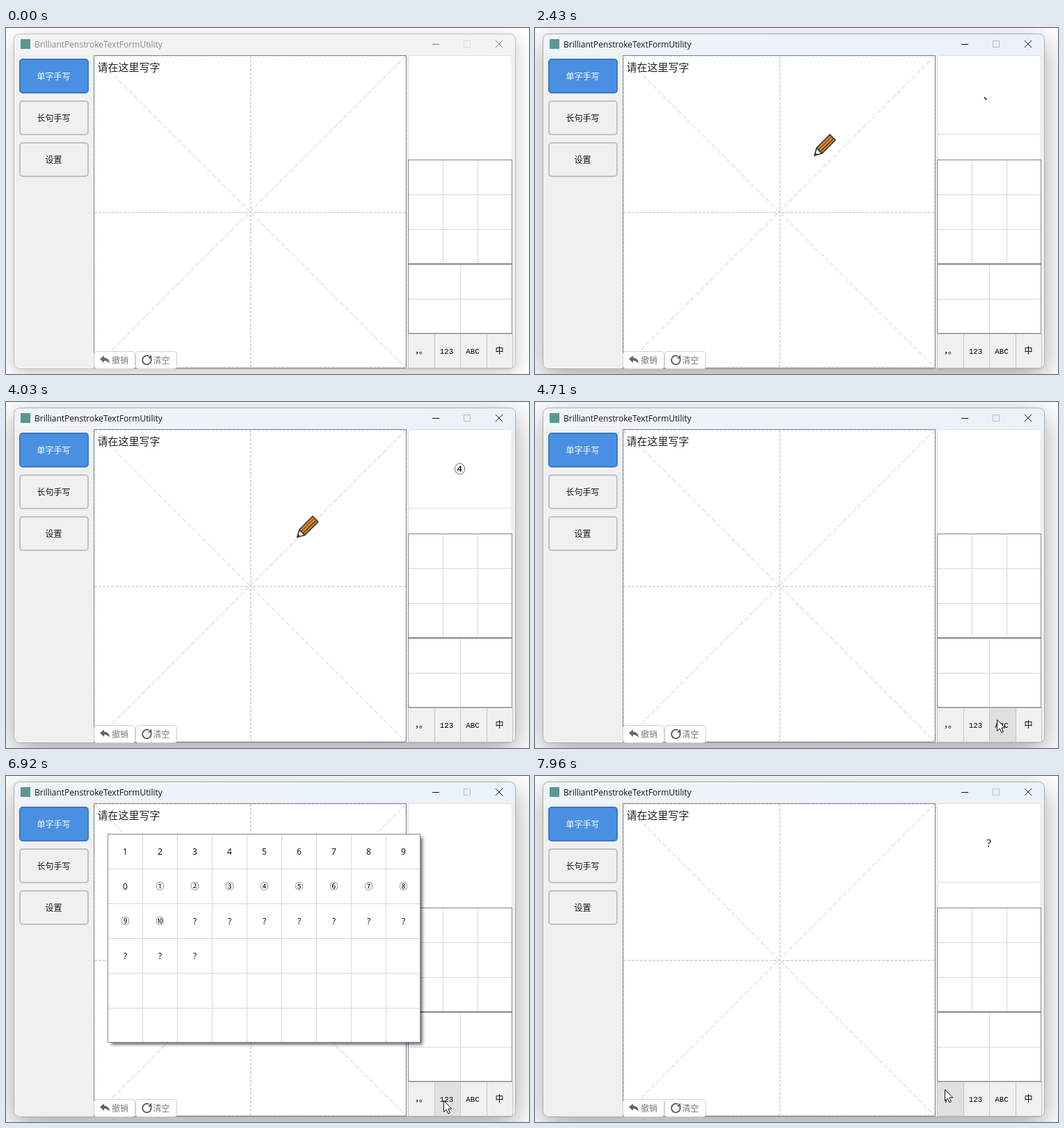
An HTML page with a canvas for the animation above (8 s loop, 752x497 px).

```html
<!DOCTYPE html>
<html lang="zh">
<head>
<meta charset="utf-8">
<style>
html, body { margin: 0; width: 100%; height: 100%; overflow: hidden; background: #fff; }
canvas { display: block; }
</style>
</head>
<body>
<canvas id="stage" width="752" height="497"></canvas>
<script>
const ctx = document.getElementById('stage').getContext('2d');
const LOOP = 8000;
const CJK = '"Noto Sans CJK SC", "Noto Sans CJK", sans-serif';
const UI = '"Open Sans", "Noto Sans CJK SC", sans-serif';
const MONO = '"Liberation Mono", "Noto Sans CJK SC", monospace';
const SERIF = '"Liberation Serif", "Noto Sans CJK SC", serif';
const EDGE = '#828790', GRID = '#d8d8d8';

const ACTIVE_AT = 2110;
const KEY_X = [578, 616, 653, 691, 728];
const KEY_LABELS = ['，。', '123', 'ABC', '中'];

const letters = 'ABCDEFGHIJKLMNOPQRSTUVWXYZ';
const SETS = [
  '。，、；：？！…—""\'\'（）《》〈〉【】『』「」﹃﹄［］｛｝．，？！～',
  '1234567890①②③④⑤⑥⑦⑧⑨⑩??????????',
  letters + letters.toLowerCase()
];
const TINTS = { '；': '#2a6f9a', '：': '#2a6f9a', '，': '#3a6a88', '「': '#b87328' };

// Each visit: popup key, open and close time, chosen symbol, time the result clears
const VISITS = [
  { key: 0, open: 860, close: 2110, pick: '、', clear: 2610 },
  { key: 1, open: 3470, close: 3960, pick: '④', clear: 4450 },
  { key: 2, open: 4910, close: 5920, pick: 'L', clear: 6420 },
  { key: 1, open: 6920, close: 7540, pick: '?', clear: LOOP }
];

// Pointer path: time, x, y
const PATH = [
  [290, 562, 490], [450, 597, 474], [1230, 597, 474], [1630, 424, 175],
  [1850, 310, 126], [2070, 264, 119], [2310, 277, 113], [2560, 533, 259],
  [2700, 630, 380], [2830, 668, 437], [2910, 668, 437], [3270, 631, 468],
  [3430, 630, 468], [3850, 372, 155], [3960, 372, 155], [4230, 546, 309],
  [4270, 577, 328], [4710, 664, 456], [4910, 664, 456], [5350, 250, 129],
  [5560, 250, 129], [5760, 273, 170], [5960, 273, 170], [6400, 545, 420],
  [6520, 592, 480], [6720, 629, 467], [6920, 629, 467], [7400, 418, 205],
  [7540, 418, 205], [7720, 420, 358], [7960, 589, 450]
];

function pointerAt(t) {
  if (t < PATH[0][0]) return null;
  const i = PATH.findIndex(p => p[0] > t);
  if (i < 0) { const p = PATH[PATH.length - 1]; return { x: p[1], y: p[2] }; }
  const a = PATH[i - 1], b = PATH[i], k = (t - a[0]) / (b[0] - a[0]);
  return { x: Math.round(a[1] + (b[1] - a[1]) * k), y: Math.round(a[2] + (b[2] - a[2]) * k) };
}

function text(str, x, y, size, family, color = '#000', align = 'center') {
  ctx.font = `${size}px ${family}`;
  ctx.fillStyle = color;
  ctx.textAlign = align;
  ctx.fillText(str, x, y);
}

function line(x1, y1, x2, y2, color, width = 1) {
  ctx.strokeStyle = color;
  ctx.lineWidth = width;
  ctx.beginPath();
  ctx.moveTo(x1, y1);
  ctx.lineTo(x2, y2);
  ctx.stroke();
}

function roundBox(x, y, w, h, r, fill, stroke, width = 1) {
  ctx.beginPath();
  ctx.roundRect(x + width / 2, y + width / 2, w - width, h - width, r);
  ctx.fillStyle = fill;
  ctx.fill();
  ctx.strokeStyle = stroke;
  ctx.lineWidth = width;
  ctx.stroke();
}

function polygon(points, fill, stroke, width = 1) {
  ctx.beginPath();
  points.forEach(([x, y]) => ctx.lineTo(x, y));
  ctx.closePath();
  ctx.fillStyle = fill;
  ctx.fill();
  if (stroke) { ctx.strokeStyle = stroke; ctx.lineWidth = width; ctx.stroke(); }
}

function table(x, y, cols, rows, cw, ch) {
  const w = cols * cw, h = rows * ch;
  ctx.fillStyle = '#fff';
  ctx.fillRect(x, y, w, h);
  for (let c = 1; c < cols; c++) line(x + c * cw + .5, y, x + c * cw + .5, y + h, GRID);
  for (let r = 1; r < rows; r++) line(x, y + r * ch + .5, x + w, y + r * ch + .5, GRID);
  ctx.strokeStyle = EDGE;
  ctx.strokeRect(x + .5, y + .5, w - 1, h - 1);
}

function drawWindow(active) {
  ctx.fillStyle = '#fff';
  ctx.fillRect(0, 0, 752, 497);
  ctx.save();
  ctx.shadowColor = active ? 'rgba(0,0,0,.36)' : 'rgba(0,0,0,.22)';
  ctx.shadowBlur = active ? 40 : 26;
  ctx.shadowOffsetY = active ? 12 : 7;
  ctx.fillStyle = '#f0f0f0';
  ctx.beginPath();
  ctx.roundRect(11, 8, 722, 482, 8);
  ctx.fill();
  ctx.restore();

  ctx.save();
  ctx.beginPath();
  ctx.roundRect(11.5, 8.5, 721, 481, 8);
  ctx.clip();
  ctx.fillStyle = '#f0f0f0';
  ctx.fillRect(11, 8, 722, 482);
  const bar = ctx.createLinearGradient(11, 0, 733, 0);
  bar.addColorStop(0, active ? '#eff4f9' : '#f3f3f3');
  bar.addColorStop(1, active ? '#eaf1f9' : '#f3f3f3');
  ctx.fillStyle = bar;
  ctx.fillRect(11, 8, 722, 31);
  ctx.restore();
  ctx.strokeStyle = active ? '#a9adb2' : '#bdbdbd';
  ctx.lineWidth = 1;
  ctx.beginPath();
  ctx.roundRect(11.5, 8.5, 721, 481, 8);
  ctx.stroke();

  ctx.fillStyle = '#5b9791';
  ctx.fillRect(21, 16, 14, 14);
  text('BrilliantPenstrokeTextFormUtility', 41, 28, 12, UI, active ? '#111' : '#8a8a8a', 'left');

  const ink = active ? '#111' : '#777';
  line(613, 23.5, 623, 23.5, ink);
  ctx.strokeStyle = active ? '#b9bdc2' : '#dcdcdc';
  ctx.strokeRect(658.5, 18.5, 9, 9);
  line(704, 18, 714, 28, ink);
  line(714, 18, 704, 28, ink);
}

function drawMenu() {
  ['单字手写', '长句手写', '设置'].forEach((label, i) => {
    const y = 44 + i * 60, on = i === 0;
    roundBox(19, y, 100, 50, 4, on ? '#4a90e2' : '#f0f0f0', on ? '#357abd' : '#c0c0c0', 2);
    text(label, 68.5, y + 30, 12, CJK, on ? '#fff' : '#111');
  });
}

function drawPad() {
  ctx.fillStyle = '#fff';
  ctx.fillRect(126, 39, 450, 450);
  ctx.strokeStyle = EDGE;
  ctx.lineWidth = 1;
  ctx.strokeRect(126.5, 39.5, 449, 449);
  ctx.setLineDash([4, 2]);
  ctx.strokeStyle = '#dcdcdc';
  ctx.strokeRect(127.5, 40.5, 447, 447);
  line(352, 40, 352, 488, '#dadada', 2);
  line(127, 265, 575, 265, '#dadada', 2);
  ctx.setLineDash([7, 3]);
  line(127, 40, 575, 488, '#dcdcdc', 1.3);
  line(575, 40, 127, 488, '#dcdcdc', 1.3);
  ctx.setLineDash([]);
  text('请在这里写字', 131.5, 62, 15, CJK, '#222', 'left');

  roundBox(126, 464, 60, 26, 4, '#fff', '#d0d0d0');
  roundBox(186, 464, 60, 26, 4, '#fff', '#d0d0d0');
  text('撤销', 152, 481.5, 12, CJK, '#777', 'left');
  text('清空', 211.5, 481.5, 12, CJK, '#777', 'left');

  ctx.fillStyle = '#666';
  ctx.beginPath();
  ctx.moveTo(135, 475.5);
  ctx.lineTo(141, 470.5);
  ctx.lineTo(141, 473.5);
  ctx.quadraticCurveTo(149, 474, 149, 482);
  ctx.quadraticCurveTo(146, 478, 141, 477.8);
  ctx.lineTo(141, 481);
  ctx.fill();

  ctx.strokeStyle = '#555';
  ctx.lineWidth = 1.8;
  ctx.beginPath();
  ctx.arc(202.5, 477, 6.3, -.35, -1.05, false);
  ctx.stroke();
  polygon([[204, 474.5], [209.5, 475], [209, 469.5]], '#555');
}

function drawSide(result, hover) {
  if (result) {
    roundBox(578, 39, 150, 114, 4, '#fff', '#dedede');
    roundBox(578, 152, 150, 38, 4, '#fff', '#dedede');
    text(result, 652.5, 102, 16, SERIF);
  } else {
    roundBox(578, 39, 150, 151, 4, '#fff', '#e2e2e2');
  }
  table(578, 189, 3, 3, 50, 50);
  table(578, 339, 2, 2, 75, 50);
  KEY_LABELS.forEach((label, i) => {
    const x = KEY_X[i], w = KEY_X[i + 1] - x;
    ctx.fillStyle = i === hover ? '#e0e0e0' : '#f0f0f0';
    ctx.fillRect(x, 439, w, 50);
    ctx.strokeStyle = '#c3c3c3';
    ctx.lineWidth = 1;
    ctx.strokeRect(x + .5, 439.5, w, 49);
    const latin = i === 1 || i === 2;
    text(label, x + w / 2 - (latin ? 1 : 0), 468, latin ? 10.8 : 12, latin ? MONO : CJK);
  });
}

function drawPopup(key) {
  ctx.save();
  ctx.shadowColor = 'rgba(0,0,0,.55)';
  ctx.shadowBlur = 4;
  ctx.shadowOffsetX = ctx.shadowOffsetY = 3;
  ctx.fillStyle = '#fff';
  ctx.fillRect(148, 85, 448, 298);
  ctx.restore();
  table(146, 83, 9, 6, 50, 50);
  [...SETS[key]].forEach((ch, i) => {
    const x = 171.5 + i % 9 * 50, y = 113 + Math.floor(i / 9) * 50;
    text(ch, x, y, 12, ch < '\u0100' ? UI : CJK, TINTS[ch] || '#000');
  });
}

function drawArrow(x, y) {
  ctx.save();
  ctx.translate(x + .5, y + .5);
  polygon([[0, 0], [0, 16], [3.7, 12.6], [6.3, 18.4], [8.8, 17.3], [6.3, 11.6], [11.3, 11.4]], '#fff', '#111');
  ctx.restore();
}

function drawPencil(x, y) {
  ctx.save();
  ctx.translate(x, y);
  ctx.rotate(-Math.PI / 4);
  ctx.lineJoin = 'round';
  polygon([[1, 0], [11, -5.5], [11, 5.5]], '#f6eee2', '#3b3d45', 1.6);
  polygon([[0, 0], [5, -2.7], [5, 2.7]], '#33353c');
  polygon([[11, -5.5], [38, -5.5], [38, 5.5], [11, 5.5]], '#e58e22', '#3b3d45', 1.8);
  line(12, -1.8, 37, -1.8, '#6b4a25', 1.2);
  line(12, 2, 37, 2, '#4a3a2c', 1.6);
  ctx.restore();
}

function render(t) {
  const popup = VISITS.find(v => t >= v.open && t < v.close);
  const shown = VISITS.find(v => t >= v.close && t < v.clear);
  const p = pointerAt(t);
  let hover = -1;
  if (popup) hover = popup.key;
  else if (p && p.y >= 439 && p.y < 489) hover = KEY_LABELS.findIndex((_, i) => p.x >= KEY_X[i] && p.x < KEY_X[i + 1]);

  drawWindow(t >= ACTIVE_AT);
  drawMenu();
  drawPad();
  drawSide(shown && shown.pick, hover);
  if (popup) drawPopup(popup.key);
  if (!p) return;
  const writing = !popup && p.x >= 126 && p.x <= 577 && p.y >= 39 && p.y < 489;
  (writing ? drawPencil : drawArrow)(p.x, p.y);
}

const start = performance.now();
function frame() {
  render((performance.now() - start) % LOOP);
  requestAnimationFrame(frame);
}
frame();
</script>
</body>
</html>
```
